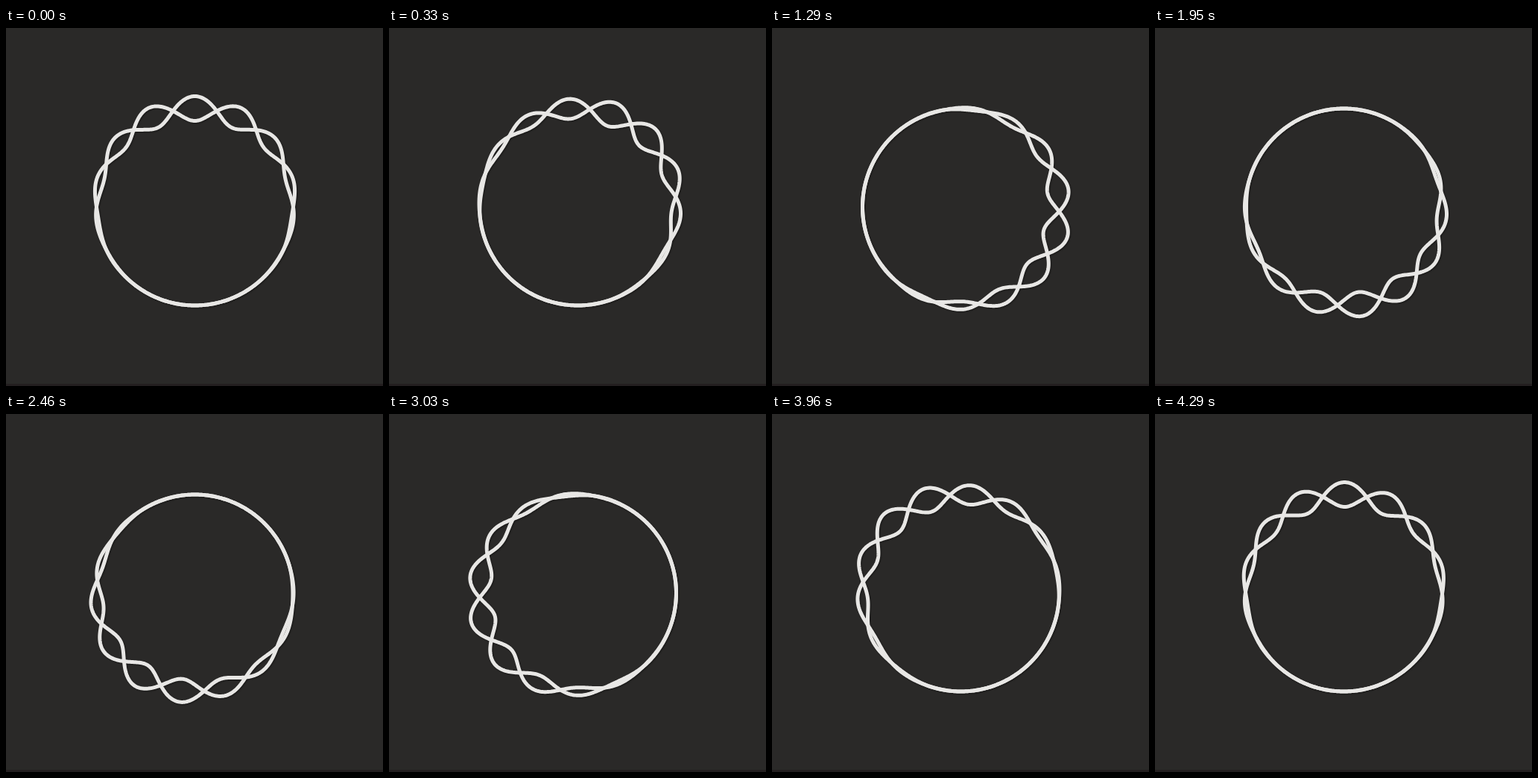
Write an HTML page that moves like this. It is 506 px wide and 480 px high and loops after 4320 ms.

```html
<!DOCTYPE html>
<html lang="en">
<head>
<meta charset="utf-8">
<title>Travelling braid</title>
<style>
  html, body { margin: 0; width: 100%; height: 100%; overflow: hidden; background: #2a2928; }
  svg { display: block; }
  .strands {
    fill: none;
    stroke: #e8e7e5;
    stroke-width: 5;
    stroke-linejoin: round;
    filter: drop-shadow(1px 1px 1px rgba(0, 0, 0, .45));
  }
</style>
</head>
<body>
<svg width="506" height="480" viewBox="0 0 506 480">
  <rect width="506" height="480" fill="#2a2928"/>
  <rect y="477" width="506" height="3" fill="#231f20"/>
  <g class="strands"><path id="outer"/><path id="inner"/></g>
</svg>
<script>
  const LOOP = 4320, CX = 253.5, CY = 240, RADIUS = 132;
  const AMPLITUDE = 16.5, WAVES = 7, STEPS = 540, TAU = 2 * Math.PI;
  const outer = document.getElementById('outer');
  const inner = document.getElementById('inner');

  // Angles run clockwise from the top of the ring.
  function strand(progress, sign) {
    let d = '';
    for (let i = 0; i < STEPS; i++) {
      const angle = TAU * i / STEPS;
      const envelope = ((1 + Math.cos(angle - TAU * progress)) / 2) ** 2.5;
      const wave = Math.cos(WAVES * angle + 1.5 * TAU * progress);
      const r = RADIUS + sign * AMPLITUDE * envelope * wave;
      const x = CX + r * Math.sin(angle);
      const y = CY - r * Math.cos(angle);
      d += (i ? 'L' : 'M') + x.toFixed(2) + ' ' + y.toFixed(2);
    }
    return d + 'Z';
  }

  function render(time) {
    const progress = (time % LOOP) / LOOP;
    outer.setAttribute('d', strand(progress, 1));
    inner.setAttribute('d', strand(progress, -1));
  }

  const start = performance.now();
  function tick() {
    render(performance.now() - start);
    requestAnimationFrame(tick);
  }
  tick();
</script>
</body>
</html>
```
